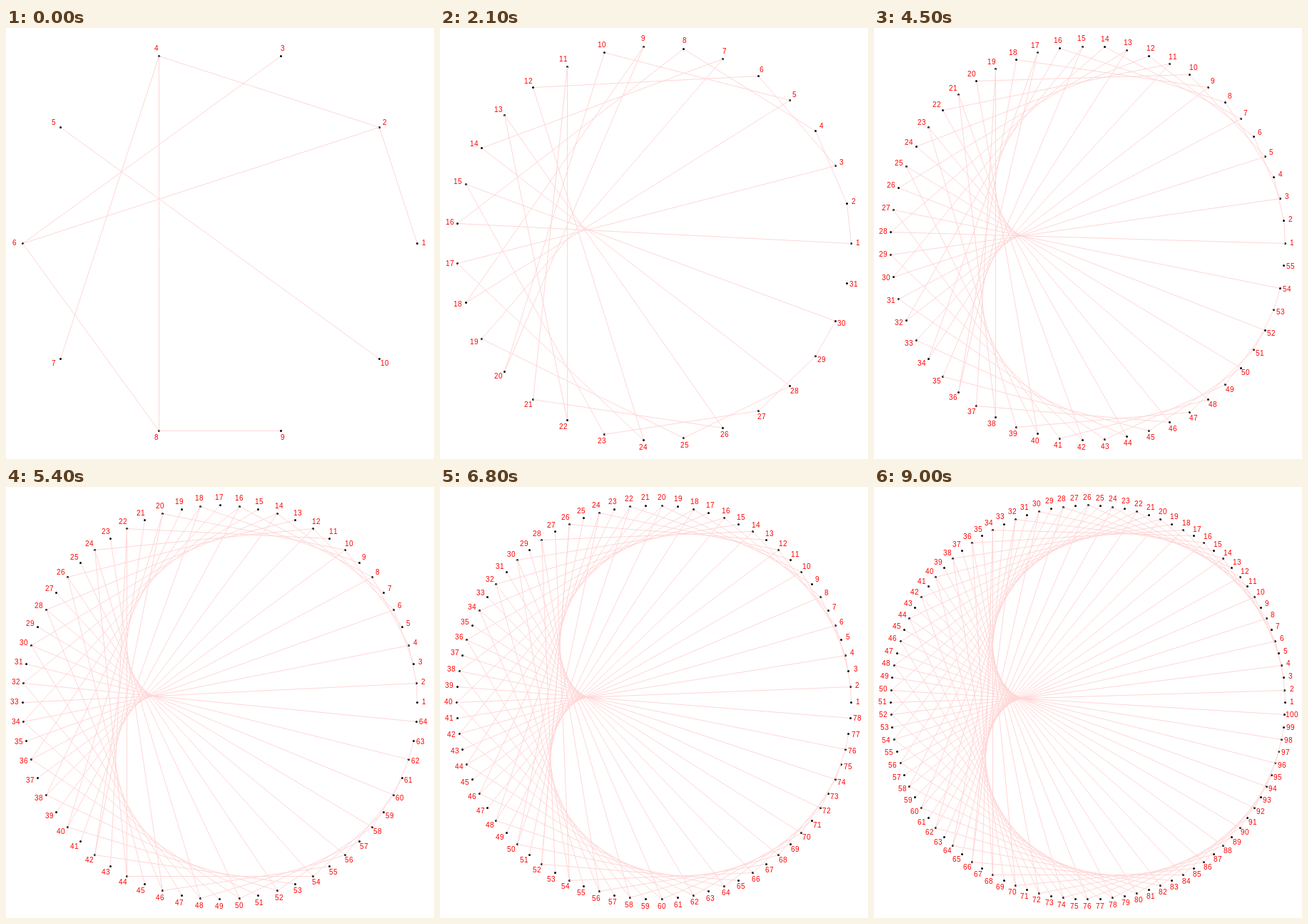
An HTML page with a canvas that plays this animation: 600x605 px, repeating every 9100 ms.

```html
<!DOCTYPE html>
<html lang="en">
<head>
<meta charset="utf-8">
<title>Doubling circle</title>
<style>
html, body { margin: 0; width: 100%; height: 100%; overflow: hidden; background: #fff; }
canvas { display: block; }
</style>
</head>
<body>
<canvas id="stage" width="600" height="605"></canvas>
<script>
const ctx = document.getElementById('stage').getContext('2d', { alpha: false });
const STEP = 100, FIRST = 10, LAST = 100;
const LOOP = (LAST - FIRST + 1) * STEP;
const DIGIT = 6;

function onCircle(i, n, cx, cy, r) {
  const a = (i - 1) / n * Math.PI * 2;
  return [cx + r * Math.cos(a), cy - r * Math.sin(a)];
}

// Points sit on pixel centres.
const point = (i, n) =>
  onCircle(i, n, 300, 302.4, 276.5).map(v => Math.floor(v) + 0.5);

function line(a, b) {
  ctx.beginPath();
  ctx.moveTo(...a);
  ctx.lineTo(...b);
  ctx.stroke();
}

function dot([x, y]) {
  ctx.fillStyle = '#000';
  ctx.beginPath();
  ctx.arc(x, y, 1.5, 0, Math.PI * 2);
  ctx.fill();
}

function label(i, n) {
  const [x, y] = onCircle(i, n, 299.3, 301.5, 287);
  const text = String(i);
  const left = Math.round(x - text.length * DIGIT / 2);
  const base = Math.round(y + 3.6);
  ctx.fillStyle = '#f00';
  [...text].forEach((c, k) => ctx.fillText(c, left + k * DIGIT, base));
}

function draw(n) {
  ctx.fillStyle = '#fff';
  ctx.fillRect(0, 0, 600, 605);
  ctx.strokeStyle = '#ffd6d6';
  ctx.lineWidth = 1;
  ctx.font = '10px "Liberation Sans", Arial, sans-serif';
  for (let i = 1; i <= n; i++) {
    const p = point(i, n);
    const twice = 2 * i > n ? 2 * i - n : 2 * i;
    if (twice !== i) line(p, point(twice, n));
    dot(p);
    label(i, n);
  }
}

const start = performance.now();
let shown = 0;

function tick() {
  const t = (performance.now() - start) % LOOP;
  const n = FIRST + Math.floor(t / STEP);
  if (n !== shown) draw(shown = n);
  requestAnimationFrame(tick);
}
tick();
</script>
</body>
</html>
```
